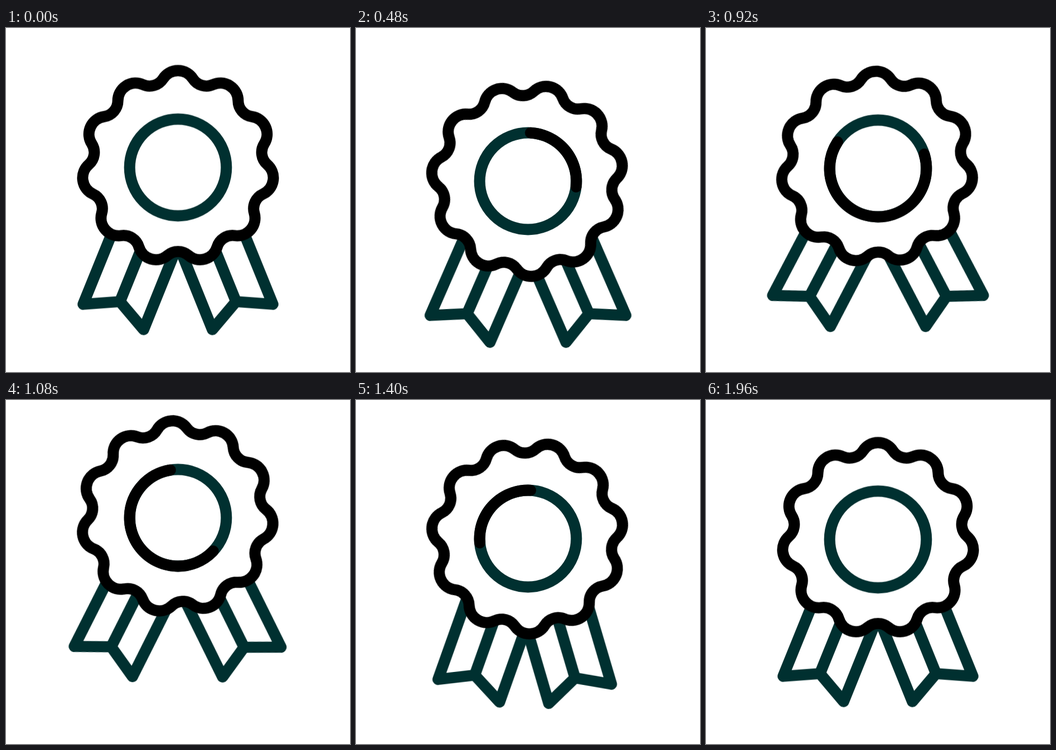
These frames come from a looping animation (640 px wide and 640 px high, 2 s). An HTML page:

```html
<!DOCTYPE html>
<html lang="en">
<head>
<meta charset="utf-8">
<title>Award rosette</title>
<style>
  @property --from { syntax: "<length>"; inherits: false; initial-value: 0px; }
  @property --to { syntax: "<length>"; inherits: false; initial-value: 0px; }

  html, body { margin: 0; width: 100%; height: 100%; overflow: hidden; background: #fff; }
  svg { display: block; width: 100vw; height: 100vh; }

  path, circle {
    fill: none;
    stroke: #003030;
    stroke-width: 20.8px;
    stroke-linecap: round;
    stroke-linejoin: round;
  }
  .filled { fill: #fff; }
  .black { stroke: #000; }

  .bob, .left, .right, .rosette, .arc {
    animation: 2s cubic-bezier(.333, 0, .667, 1) infinite;
  }
  .bob { animation-name: bob; }
  .left { animation-name: swing-left; transform-origin: 0 46px; }
  .right { animation-name: swing-right; transform-origin: 0 46px; }
  .rosette { animation-name: turn; transform-origin: 0 -5px; }
  .arc {
    animation-name: head, tail, show;
    stroke-dasharray: calc(var(--to) - var(--from)) 400px;
    stroke-dashoffset: calc(var(--from) * -1);
  }

  @keyframes bob {
    0%, 6.5% { transform: translateY(0); }
    38.75% { transform: translateY(44.9px); }
    53.25% { transform: translateY(-40.5px); }
    81.25% { transform: translateY(19.5px); }
    96%, 100% { transform: translateY(0); }
  }
  @keyframes turn {
    0%, 6% { transform: rotate(0deg); }
    46% { transform: rotate(32deg); }
    92%, 100% { transform: rotate(0deg); }
  }
  @keyframes swing-left {
    0% { transform: rotate(0deg); }
    6.5% { transform: rotate(0deg); animation-timing-function: ease-in; }
    24% { transform: rotate(1.5deg); animation-timing-function: linear; }
    36% { transform: rotate(4.6deg); animation-timing-function: ease-out; }
    41% { transform: rotate(6.4deg); }
    46% { transform: rotate(5.6deg); animation-timing-function: linear; }
    62% { transform: rotate(3.8deg); }
    80% { transform: rotate(-11.1deg); }
    93%, 100% { transform: rotate(0deg); }
  }
  @keyframes swing-right {
    0% { transform: rotate(0deg); }
    6.5% { transform: rotate(0deg); animation-timing-function: ease-in; }
    24% { transform: rotate(1.5deg); animation-timing-function: linear; }
    36% { transform: rotate(4.6deg); animation-timing-function: ease-out; }
    41% { transform: rotate(6.4deg); }
    46% { transform: rotate(5.6deg); animation-timing-function: linear; }
    62% { transform: rotate(3deg); }
    80% { transform: rotate(-17.5deg); }
    93%, 100% { transform: rotate(0deg); }
  }
  @keyframes head {
    0%, 6% { --to: 0px; }
    60%, 100% { --to: 360px; }
  }
  @keyframes tail {
    0%, 28% { --from: 0px; }
    92%, 100% { --from: 360px; }
  }
  @keyframes show {
    0%, 6.9% { visibility: hidden; }
    7%, 91.9% { visibility: visible; }
    92%, 100% { visibility: hidden; }
  }
</style>
</head>
<body>
<svg viewBox="0 0 640 640">
  <defs>
    <g id="ribbon">
      <path class="filled" d="M-110 90.5 L-176.5 254.5 L-108 249.5 L-64 301.5 L21 90.5"/>
      <path d="M-108 249.5 L-56 121"/>
    </g>
  </defs>
  <g transform="translate(320 259.5)">
    <g class="bob">
      <g class="left"><use href="#ribbon"/></g>
      <g transform="scale(-1 1)"><g class="right"><use href="#ribbon"/></g></g>
      <g class="rosette">
        <path id="edge" class="filled black" transform="translate(0 -1.4)"/>
      </g>
      <circle r="90"/>
      <circle class="arc black" r="90" pathLength="360" transform="rotate(-87)"/>
    </g>
  </g>
</svg>
<script>
  // Scalloped edge: outward and inward arcs meeting at the inflection points.
  const LOBES = 11, RADIUS = 166.1, HALF = 9.6;

  function point(deg) {
    const a = deg * Math.PI / 180;
    return `${(RADIUS * Math.sin(a)).toFixed(2)} ${(-RADIUS * Math.cos(a)).toFixed(2)}`;
  }

  let d = `M${point(-HALF)}`;
  for (let i = 0; i < LOBES; i++) {
    const mid = i * 360 / LOBES;
    d += `A33 33 0 0 1 ${point(mid + HALF)}`;
    d += `A30 30 0 0 0 ${point(mid + 360 / LOBES - HALF)}`;
  }
  document.getElementById("edge").setAttribute("d", d + "Z");
</script>
</body>
</html>
```
